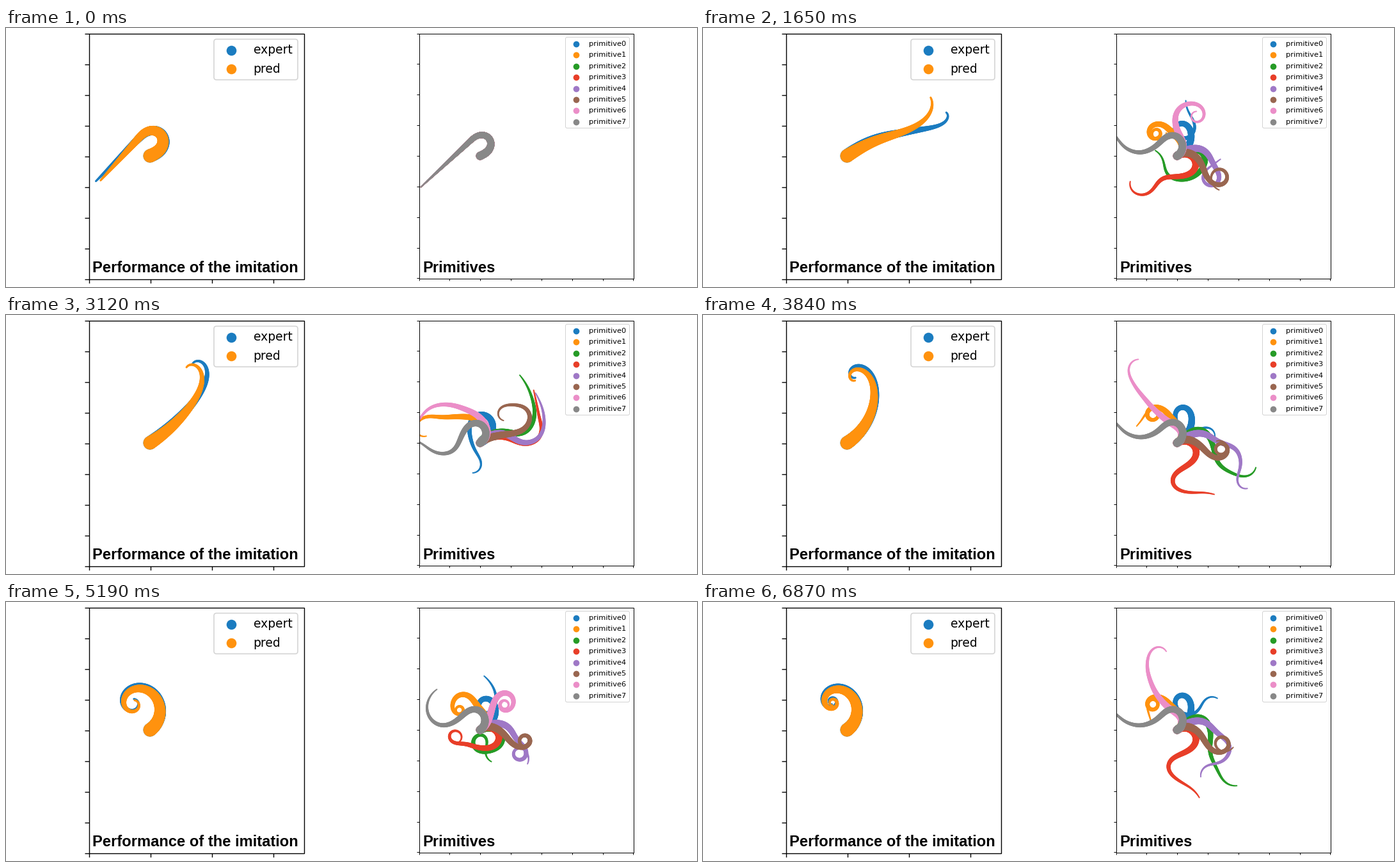
A matplotlib script for the animation above (6900 ms loop, 1080 by 405 pixels).

```python
import numpy as np
import matplotlib.pyplot as plt
from matplotlib.animation import FuncAnimation
from matplotlib.patches import FancyBboxPatch, Rectangle

W, H, DPI = 1080, 405, 100
PT = 72 / DPI
FRAMES, STEP_MS, CYCLE = 230, 30, 96
N = 150                        # dots per arm
S = np.linspace(0, 1, N)       # position along an arm, base to tip
COLORS = ["#1b7cc0", "#ff920e", "#269b26", "#e83e28",
          "#9f78c6", "#996650", "#eb8ec8", "#888888"]


def hermite(t, xs, ys):
    """Smooth curve through ys at xs, for a scalar or vector t."""
    xs, ys = np.asarray(xs, float), np.asarray(ys, float)
    m = np.gradient(ys, xs, axis=0)
    i = np.clip(np.searchsorted(xs, t, side="right") - 1, 0, len(xs) - 2)
    h = xs[i + 1] - xs[i]
    u = (t - xs[i]) / h
    return ((1 + 2 * u) * (1 - u) ** 2 * ys[i] + u * (1 - u) ** 2 * h * m[i]
            + u * u * (3 - 2 * u) * ys[i + 1] + u * u * (u - 1) * h * m[i + 1])


# A pose is the heading in degrees at each point of an arm of fixed length.
def hook(base, turn, end):
    """Turns smoothly until `end`, then runs straight."""
    u = np.clip(S / end, 0, 1)
    return base + turn * u * u * (3 - 2 * u)


def coil(base, bend, curl, power):
    """Even bend, with extra curl growing towards the tip."""
    return base + bend * S + curl * S ** power


def wave(*headings):
    return hermite(S, np.linspace(0, 1, len(headings)), headings)


def place(base, length, heading):
    a = np.radians((heading[1:] + heading[:-1]) / 2)
    steps = np.column_stack([np.cos(a), -np.sin(a)]) * length / (N - 1)
    return np.vstack([[base], base + np.cumsum(steps, axis=0)])


def ease(t, end, power):
    return end * (t / end) ** power if t < end else t


# Left arms: unroll from a hook, reach out, then coil up.
LEFT_TIMES = [0, 34, 77, 128, 173, 209, 229]
COILS = [coil(33, 105, 240, 7), coil(35, 270, 230, 5),
         coil(35, 270, 360, 5), coil(35, 270, 420, 5)]
EXPERT = [hook(22, 203, 0.48), coil(33, 5, 150, 16), coil(38, -25, 110, 9)] + COILS
PRED = [hook(25, 203, 0.5), coil(31, 15, 115, 5), coil(31, 0, 78, 6)] + COILS
LEFT_ARMS = [(181, EXPERT), (173, PRED)]

# Right arms: one shared hook, then an own wave for each primitive.
RIGHT_TIMES = [0, 17, 32, 37, 77, 95]
RIGHT_LENGTH = 175


def primitive(early, mid, bend, late):
    a, b, d = wave(*early), wave(*mid), wave(*late)
    c = b + bend * S ** 2
    return [hook(25, 198, 0.4), a, b, c, d, d + 0.15 * (d - c)]


PRIMITIVES = [
    primitive((25, 72, 155, 260, 300, 310, 185),
              (30, 66, 122, 256, 330, 378, 270), 60,
              (20, 65, 140, 282, 415, 468, 500)),
    primitive((30, 122, 162, 180, 190, 280, 415),
              (30, 127, 134, 215, 395, 580, 590), 60,
              (25, 122, 132, 225, 335, 600, 900)),
    primitive((60, 3, -42, 20, 67, 87, 112),
              (42, 26, -54, -77, -35, -9, 75), -70,
              (30, -38, -140, -195, -320, -460, -390)),
    primitive((45, -15, -66, -18, 68, 75, 76),
              (35, -52, -137, -135, -33, 0, -15), -45,
              (40, -52, -157, -197, -194, -360, -530)),
    primitive((55, -2, -66, -15, 42, 70, 97),
              (40, 15, -32, -19, -78, -102, 10), -95,
              (40, 0, -58, -53, -197, -375, -475)),
    primitive((40, -4, -18, 50, 155, 220, 380),
              (40, -28, -40, 48, 212, 410, 560), -150,
              (40, -30, -45, 40, 235, 420, 600)),
    primitive((30, 112, 141, 153, 181, 222, 232),
              (25, 140, 140, 131, 126, 100, 5), -65,
              (35, 73, 52, -62, -187, -400, -680)),
    primitive((30, 132, 227, 243, 175, 132, 165),
              (30, 124, 217, 199, 158, 135, 220), 10,
              (35, 128, 217, 203, 140, 82, 35)),
]

fig = plt.figure(figsize=(W / DPI, H / DPI), dpi=DPI, facecolor="white")
ax = fig.add_axes([0, 0, 1, 1])
ax.set(xlim=(0, W), ylim=(H, 0))
ax.axis("off")


def panel(x0, y0, x1, y1, dx, dy, size, lw, title):
    box = Rectangle((x0, y0), x1 - x0, y1 - y0, fill=False, ec="black",
                    lw=lw * PT, zorder=4)
    ax.add_patch(box)
    ends = [((x, x), (y1, y1 + size)) for x in np.arange(x0, x1 + 1, dx)]
    ends += [((x0 - size, x0), (y, y)) for y in np.arange(y0, y1 + 1, dy)]
    for xs, ys in ends:
        ax.plot(xs, ys, color="black", lw=lw * PT, zorder=4,
                solid_capstyle="butt")
    ax.text(x0 + 5.5, 381.5, title, family="Liberation Sans", weight="bold",
            size=23.8 * PT, zorder=6)
    return box


def legend(x0, y0, x1, y1, lw, radius, labels, row, dot, dot_xy, text_xy, px):
    ax.add_patch(FancyBboxPatch(
        (x0, y0), x1 - x0, y1 - y0, fc=(1, 1, 1, 0.8), ec="#d4d4d4",
        lw=lw * PT, zorder=5,
        boxstyle=f"round,pad=0,rounding_size={radius}"))
    for i, name in enumerate(labels):
        ax.scatter(dot_xy[0], dot_xy[1] + row * i, s=(dot * PT) ** 2,
                   color=COLORS[i], lw=0, zorder=6)
        ax.text(text_xy[0], text_xy[1] + row * i, name,
                family="DejaVu Sans", size=px * PT, zorder=6)


def arms(count, base_w, tip_w, clip):
    width = np.tile(np.linspace(base_w, tip_w, N), count)
    dots = ax.scatter(0 * width, 0 * width, s=(width * PT) ** 2,
                      c=np.repeat(COLORS[:count], N), linewidths=0, zorder=2)
    dots.set_clip_path(clip)
    return dots


left = panel(129.5, 8.5, 465.5, 392.5, 96, 48, 6.5, 1.4,
             "Performance of the imitation")
right = panel(645.5, 8.5, 980.5, 391.5, 47.85, 47.87, 3.5, 1, "Primitives")
legend(325, 17.5, 456, 81, 1.6, 4, ["expert", "pred"], 29,
       15.6, (352, 35.3), (386.5, 40.5), 18.8)
legend(874.5, 14.5, 974.5, 156.5, 1, 2.5, [f"primitive{i}" for i in range(8)],
       17.4, 9.7, (891, 25), (911.5, 28), 11.4)

left_dots = arms(2, 21, 3, left)
right_dots = arms(8, 13, 2, right)


def update(i):
    t = 72 if i == 73 else i  # one held step
    u = ease(t, 34, 3)
    left_dots.set_offsets(np.vstack(
        [place((225, 200), length, hermite(u, LEFT_TIMES, poses))
         for length, poses in LEFT_ARMS]))
    v = ease(t % CYCLE, 17, 0.3)
    right_dots.set_offsets(np.vstack(
        [place((741, 200), RIGHT_LENGTH, hermite(v, RIGHT_TIMES, poses))
         for poses in PRIMITIVES]))
    return left_dots, right_dots


anim = FuncAnimation(fig, update, frames=FRAMES, interval=STEP_MS,
                     init_func=lambda: update(0), repeat=True,
                     repeat_delay=0, blit=False)
plt.show()
```
